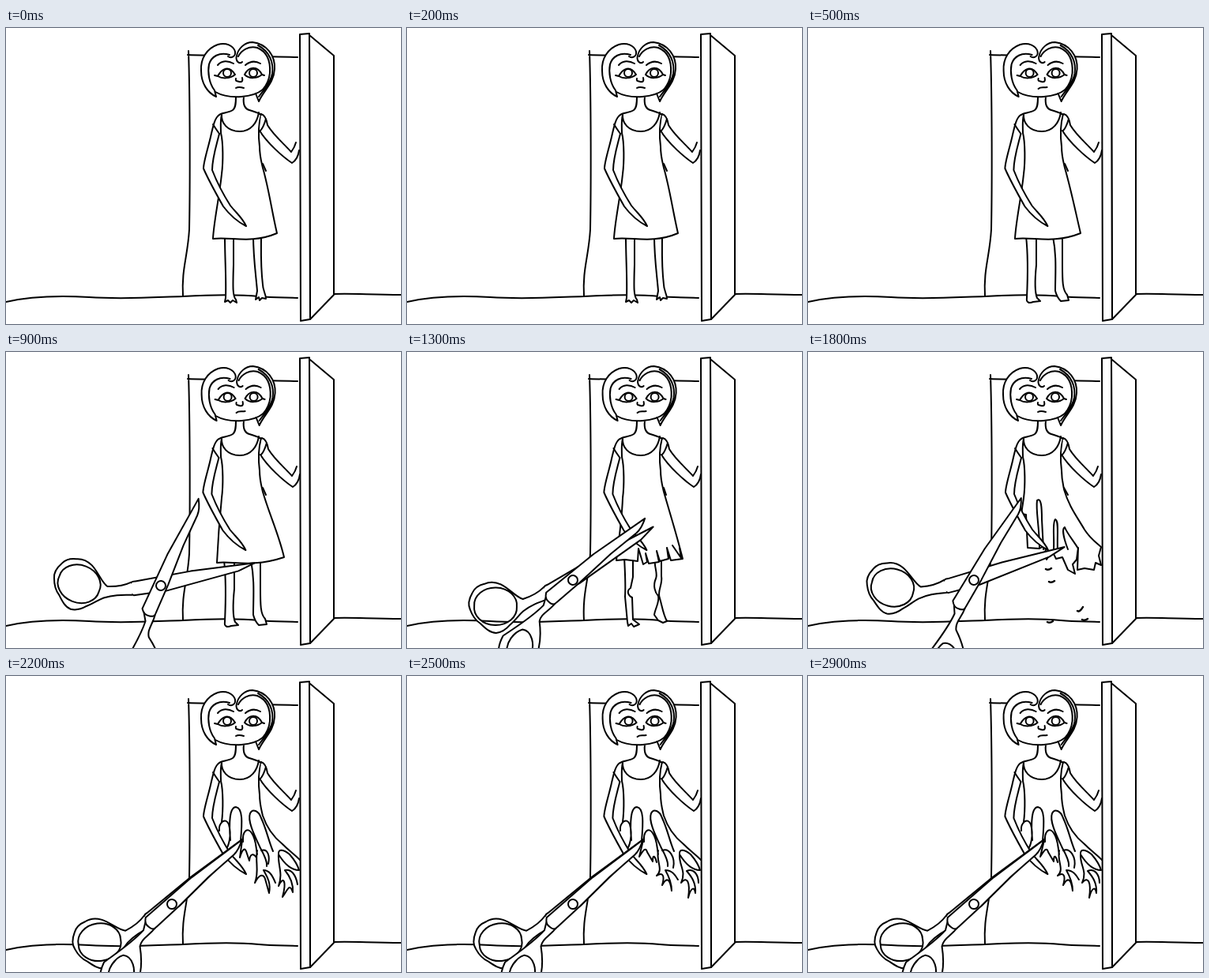
Write an HTML page that moves like this. It is 500 px wide and 375 px high and loops after 3000 ms.

```html
<!DOCTYPE html>
<html lang="en">
<head>
<meta charset="utf-8">
<title>Scissors and dress</title>
<style>
  html, body { margin: 0; width: 100%; height: 100%; overflow: hidden; background: #fff; }
  svg { display: block; width: 100%; height: 100%; fill: #fff; stroke: #000; stroke-width: 2; stroke-linecap: round; stroke-linejoin: round; }
  .line { fill: none; }
  .ring { fill-rule: evenodd; }
</style>
</head>
<body>
<svg viewBox="0 0 500 375">
  <g class="line">
    <path d="M230 34C260 35 345 36 369 37M231 29C233 90 233 200 232 255C230 290 222 305 224 340"/>
    <path d="M0 347C30 340 70 339 105 341C150 344 190 341 224 340C260 338 290 337 320 340C340 342 360 341 369 342M415 337C440 336 460 338 500 338"/>
  </g>

  <path id="legs"/>
  <path id="dress"/>
  <path id="cuts" class="line"/>

  <g id="leftArm">
    <path d="M270 110C264 114 262 125 259 138C255 155 250 170 250 178C256 192 266 210 275 226C284 238 292 245 304 251C299 240 292 235 284 225C277 214 268 198 261 180C261 165 266 150 270 134"/>
    <path class="line" d="M262 122C265 127 268 131 270 134"/>
  </g>
  <g id="rightArm">
    <path d="M323 109C328 110 330 117 331 123C338 135 350 145 361 157C364 153 366 149 367 145L371 155C370 162 367 168 362 171C350 163 330 145 321 130" stroke="none"/>
    <path class="line" d="M323 109C328 110 330 117 331 123C338 135 350 145 361 157C364 153 366 149 367 145M371 155C370 162 367 168 362 171C350 163 330 145 321 130M329 115C327 122 325 127 322 130"/>
  </g>
  <path class="line" d="M291 87C291 94 291 101 287 104C281 108 273 107 270 110M301 87C300 95 301 102 308 104C314 106 319 107 323 110M273 109C272 120 280 131 296 131C310 131 318 120 320 107"/>

  <g id="head">
    <path d="M298 88C282 88 272 85 265 81L266 87C255 82 247 70 247 54C246 39 254 26 268 21C279 18 288 22 290 31C292 24 302 18 312 18C330 20 341 35 340 52C339 70 327 78 320 93L316 83C311 86 306 87 298 88Z" stroke="none"/>
    <g class="line">
      <path d="M281 36C285 39 291 36 290 30C288 22 278 18 268 21C254 26 246 39 247 54C247 70 255 82 266 87L264 79C257 70 255 56 257 46C260 36 270 30 283 34"/>
      <path d="M299 43C295 47 290 41 292 35C294 26 302 18 312 18C330 20 341 35 340 52C339 70 327 78 320 93L316 83M294 36C298 28 308 22 318 25C330 30 335 42 334 57C333 66 330 72 325 78M319 22C334 30 339 44 337 58C335 70 326 78 320 87"/>
      <path d="M265 81C272 85 282 88 298 87C310 86 319 83 325 78"/>
      <path d="M264 60L268 61C273 52 282 46 290 59C283 65 273 64 268 61M302 59C307 49 318 47 324 59L327 60M302 59C308 65 318 64 324 59"/>
      <circle cx="280" cy="57" r="5"/><circle cx="313" cy="57" r="5"/>
      <path d="M268 47C273 41 281 41 288 45M303 47C309 42 315 41 322 45M291 64C290 68 293 67 295 68C299 69 300 67 299 63"/>
      <path id="mouth"/>
    </g>
  </g>

  <g>
    <path d="M384 9L415 35V338L385 369Z"/>
    <path d="M372 8L384 7Q385 180 385 369L373 371Q372 190 372 8Z"/>
  </g>

  <path id="scraps" class="line" stroke-width="2.5"/>

  <g id="scissors">
    <g id="lowerBlade">
      <path d="M122 0L41 -9L-30 -13Q-37 -15 -39 -8Q-42 0 -36 4L5 8L100 5Z"/>
      <path class="ring" d="M-36 -13C-45 -11 -55 -12 -66 -15C-72 -22 -73 -36 -79 -46C-84 -54 -90 -57 -96 -58C-104 -61 -110 -60 -115 -57C-123 -53 -128 -48 -129 -41C-131 -33 -131 -26 -128 -19C-126 -10 -124 -2 -118 2C-111 6 -104 5 -97 3C-88 2 -82 -1 -74 -2C-60 -3 -50 0 -38 3M-122 -42A27 22 35 1 1 -78 -11A27 22 35 1 1 -122 -42Z"/>
    </g>
    <g id="upperBlade">
      <path class="ring" d="M-37 8C-50 10 -58 6 -66 12C-72 21 -80 31 -90 38C-105 48 -128 45 -134 25C-136 10 -128 2 -113 -4C-95 -2 -70 2 -49 0L-40 -6ZM-89 6C-100 1 -116 5 -123 15C-128 28 -115 39 -102 36C-90 32 -81 15 -89 6Z"/>
      <path d="M120 0C112 5 104 7 100 7L58 6L5 8L-34 8Q-40 9 -41 2Q-43 -5 -36 -10L41 -8Z"/>
    </g>
    <circle r="6"/>
  </g>
</svg>
<script>
const FRAME_MS = 100, FRAMES = 30;
const el = Object.fromEntries([...document.querySelectorAll("[id]")].map(node => [node.id, node]));
const draw = (id, d) => el[id].setAttribute("d", d);
const move = (id, transform) => el[id].setAttribute("transform", transform);

const leftSide = "M273 110C271 118 272 126 272 133C275 145 275 170 273 185";
const rightSide = "C324 172 321 163 321 150C319 135 320 120 323 109";

const legs = {
  whole: [
    "M277 264C277 290 279 320 278 342L277 347L281 345L284 348L287 345L292 348L291 344C287 340 287 330 288 300V264M313 264C313 290 316 310 318 333L316 344L320 341L321 345L324 342L329 343C329 337 325 332 325 325C322 300 323 280 323 264",
    "M276 264C279 290 278 320 277 342C276 348 280 349 285 347L294 346L290 342C287 335 287 320 289 300V264M310 264C315 290 313 310 313 333C315 341 319 345 320 346L330 345L328 338C322 332 322 320 322 300V264"
  ],
  ragged: "M275 260C276 280 277 295 276 310L279 342L280 347L284 344L287 348L294 345L286 339L285 311C279 308 278 302 283 299L286 285V260M314 260C312 272 318 280 315 287C311 296 314 305 318 309C320 317 314 325 313 333L318 340L324 343L329 341C324 332 323 322 320 312C316 303 324 295 322 284V260"
};

const tattered = leftSide + "L270 205L276 206L278 248L293 249L300 245L302 263L309 252L314 262L322 260L329 276L338 281L335 269L340 263L342 248L341 276L350 274L362 276L364 267L371 270L368 258L371 247C363 240 357 236 350 225C340 208 330 195 324 174" + rightSide;
const slits = "M293 248C293 222 288 200 290 188C295 184 296 196 296 212L298 250M311 250C312 235 309 216 313 212C318 214 315 232 316 252M342 249C336 239 328 230 325 222C321 224 324 237 329 250";

const skirtEdge = "372 233C365 226 359 222 350 213C340 205 330 192 325 177" + rightSide;
const feathered = leftSide + "C269 187 268 195 270 202L284 225L298 222L314 238L331 268L354 275L372 245L" + skirtEdge;
const loops = [
  "M270 196C269 186 278 178 282 188C286 202 282 216 277 222M284 208C282 186 283 166 291 166C300 167 299 186 297 209M322 218C316 205 305 184 309 174C312 167 320 171 323 180C330 195 332 208 338 222",
  "M300 210C299 196 306 191 311 199C317 208 316 216 318 226M322 218C327 227 331 236 330 241M345 226C344 218 352 220 359 226C366 234 369 239 371 246C362 246 353 239 345 226"
];
const fringe = [
  "M299 208L296 230C299 220 302 217 304 222L308 234C309 225 313 224 317 230M318 221C315 235 321 247 315 262C321 250 326 251 328 257L333 275C336 261 329 252 326 246C333 246 337 252 341 262M323 221C332 218 334 229 332 238M345 226C344 240 351 250 345 266C350 254 356 257 350 280C357 270 359 262 363 274C364 261 358 252 353 246C361 244 367 252 369 264",
  "M299 208L294 229C299 221 302 216 304 223L311 235C311 225 314 228 316 236M318 221C315 235 325 245 316 253C325 247 326 255 323 265C329 254 333 257 335 272C335 263 331 253 327 246C336 246 340 253 343 258M323 221C332 217 340 230 337 243M345 226C344 240 354 247 347 262C354 253 359 260 356 281C359 268 364 266 365 275C366 262 360 254 354 247C363 243 369 252 369 262"
];

// frame, pivot x, pivot y, tilt, half opening angle
const poses = [
  [6, 152, 300, 2.5, 26.5], [9, 196, 296, 2.5, 26.5], [13, 210, 289, 5.5, 3.5],
  [18, 210, 289, 2.5, 20], [22, 210, 289, 0, 0], [30, 210, 289, 0, 0]
];

function poseAt(frame) {
  const i = poses.findIndex((p, n) => n && frame <= p[0]);
  const from = poses[i - 1], to = poses[i];
  const k = (frame - from[0]) / (to[0] - from[0]);
  return from.map((v, n) => v + (to[n] - v) * k);
}

function drawDress(frame, odd) {
  if (frame < 11) {
    const left = frame < 7 ? 262 : 267, right = frame < 7 ? 343 + 2 * odd : 352;
    draw("dress", `${leftSide}C270 215 ${left + 1} 245 ${left} 267C285 264 310 274 ${right} 260C${right - 7} 230 333 205 325 177${rightSide}`);
    draw("cuts", "M325 172L329 181");
  } else if (frame < 15) {
    draw("dress", leftSide + "C272 215 267 245 265 264L276 263L292 265L293 249L299 269L304 266L302 255L306 268L319 266L316 252L320 265L331 262L329 248L334 264L349 262C341 230 333 205 325 177" + rightSide);
    draw("cuts", "M336 245L347 261L345 248M325 172L328 181");
  } else if (frame < 20) {
    draw("dress", tattered);
    draw("cuts", slits + "M324 172L329 181");
  } else {
    draw("dress", feathered);
    draw("cuts", `${leftSide}M${skirtEdge}${loops.join("")}${fringe[odd]}`);
  }
  // Feathered strands are drawn separately, so the body is only a fill.
  el.dress.style.stroke = frame < 20 ? "" : "none";
}

function drawScraps(frame) {
  const fall = (frame - 18) * 14;
  const bits = [[301, 275], [305, 291], [341, 328], [303, 342], [347, 339]];
  draw("scraps", frame < 16 || frame > 19 ? "" : bits.map(([x, y], i) =>
    `M${x} ${Math.min(y + fall, 343)}q3 2 7 ${i === 2 ? -5 : -1}`).join(""));
}

function render(frame) {
  const odd = frame % 2;
  draw("legs", frame < 11 ? legs.whole[odd] : frame < 16 ? legs.ragged : "");
  drawDress(frame, odd);
  drawScraps(frame);
  draw("mouth", odd ? "M291 77C294 74 298 76 302 75" : "M291 76C294 74 298 75 301 76");
  move("head", `translate(${odd * 0.6} 0)`);
  move("leftArm", `translate(${-odd * 0.6} 0)`);
  move("rightArm", `translate(${odd} 0)`);

  el.scissors.style.display = frame < 6 ? "none" : "";
  if (frame < 6) return;
  const [, x, y, tilt, half] = poseAt(frame);
  move("scissors", `translate(${x} ${y}) rotate(${tilt - 42.6})`);
  move("upperBlade", `rotate(${-half})`);
  move("lowerBlade", `rotate(${half})`);
}

const start = performance.now();
function tick() {
  render(Math.floor((performance.now() - start) / FRAME_MS) % FRAMES);
  requestAnimationFrame(tick);
}
tick();
</script>
</body>
</html>
```
